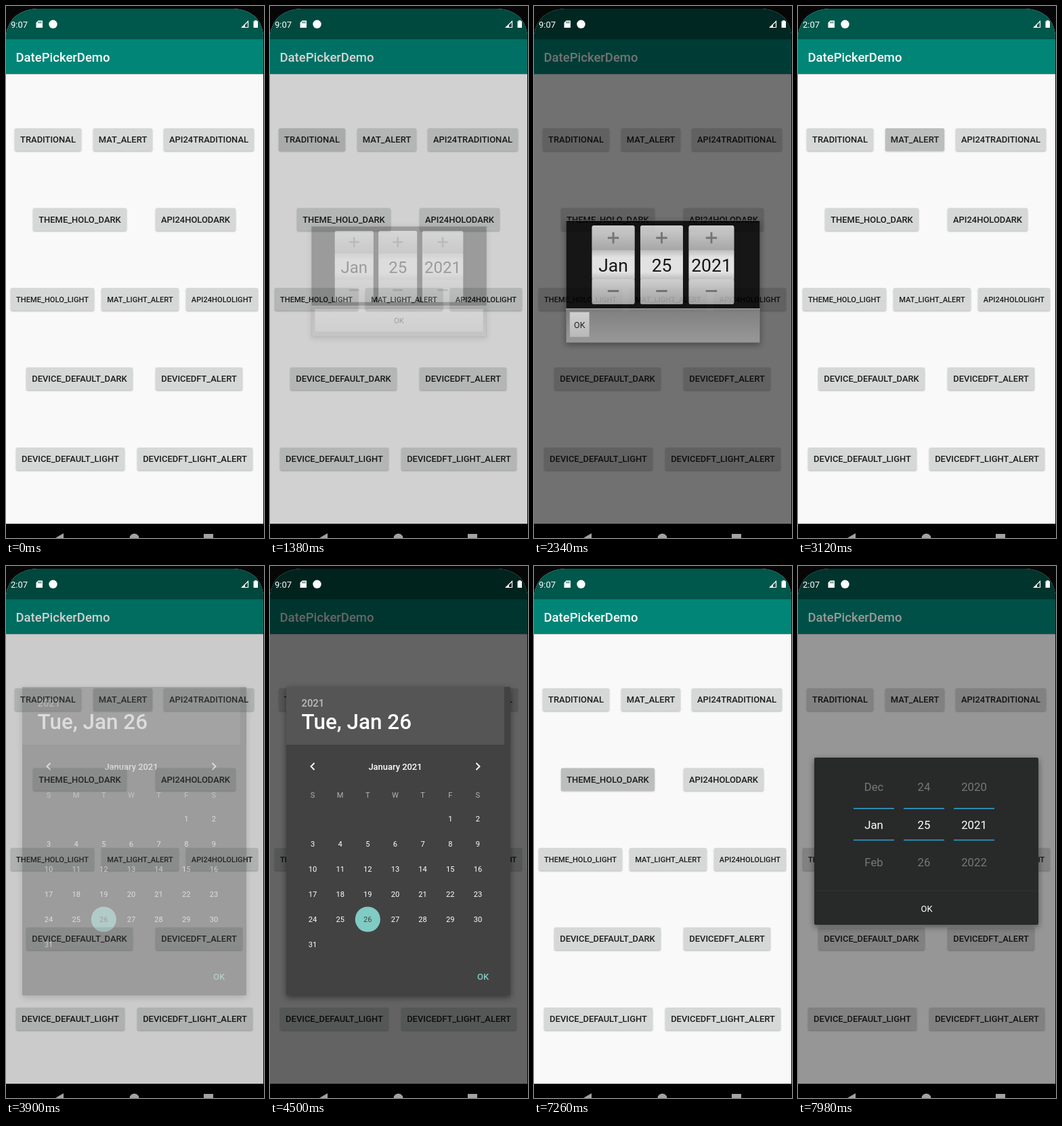
An HTML page that plays this animation: 381x783 px, repeating every 8 s.

```html
<!DOCTYPE html>
<html lang="en">
<head>
<meta charset="utf-8">
<title>Date picker demo</title>
<style>
  html, body { margin: 0; width: 100%; height: 100%; overflow: hidden; background: #060606; }
  svg { display: block; font-family: Roboto, sans-serif; }
  .medium { font-weight: 500; }
  .button { filter: drop-shadow(0 1px 1px rgba(0, 0, 0, .28)); }
  .dialog { filter: drop-shadow(0 3px 5px rgba(0, 0, 0, .45)); transform-origin: 190.5px 405.5px; }
</style>
</head>
<body>
<svg id="stage" width="381" height="783" viewBox="0 0 381 783">
  <defs>
    <clipPath id="screen"><path d="M0 783V42Q6 6 46 4H336Q375 6 380 42V783Z"/></clipPath>
    <linearGradient id="key" x2="0" y2="1"><stop stop-color="#e6e6e6"/><stop offset="1" stop-color="#b4b4b4"/></linearGradient>
    <linearGradient id="field" x2="0" y2="1">
      <stop stop-color="#d2d2d2"/><stop offset=".25" stop-color="#fff"/>
      <stop offset=".75" stop-color="#fff"/><stop offset="1" stop-color="#d2d2d2"/>
    </linearGradient>
    <linearGradient id="ok" x2="0" y2="1"><stop stop-color="#e8e8e8"/><stop offset="1" stop-color="#cbcbcb"/></linearGradient>
    <linearGradient id="bar" x2="0" y2="1"><stop stop-color="#848484"/><stop offset="1" stop-color="#a2a2a2"/></linearGradient>
  </defs>
  <g clip-path="url(#screen)">
    <rect width="381" height="783" fill="#f9f9f9"/>
    <rect width="381" height="49" fill="#00574b"/>
    <rect y="49" width="381" height="51" fill="#008577"/>
    <rect y="100" width="381" height="1" fill="#c4cecc"/>
    <text class="medium" x="14.5" y="82" font-size="18.5" fill="#fff">DatePickerDemo</text>
    <g id="buttons"></g>
    <rect id="dim" width="381" height="762"/>
  </g>
  <g fill="#fff">
    <text id="clock" x="7" y="32" font-size="13"></text>
    <path d="M47.5 21.5H54V32H44.5V24.5Z"/>
    <path d="M48 23v2.5M50 23v2.5M52 23v2.5" stroke="#00574b"/>
    <circle cx="69.5" cy="26.8" r="6.2"/>
    <path d="M348.5 31.5H357.5V22.5Z" fill="none" stroke="#fff" stroke-width="1.2"/>
    <path d="M347.5 32L353 26.500V32Z"/>
    <path d="M365.500 22.300H367.300V21H370.300V22.300H372V32H365.500Z"/>
  </g>
  <rect y="762" width="381" height="21"/>
  <g fill="#a3a3a3">
    <path d="M85 776V790L73 783Z"/>
    <circle cx="189.500" cy="783.500" r="7"/>
    <rect x="292" y="777" width="14" height="14"/>
  </g>
  <g id="trad" class="dialog"></g>
  <g id="material" class="dialog"></g>
  <g id="holo" class="dialog"></g>
</svg>
<script>
const $ = id => document.getElementById(id);
const rect = (x, y, w, h, fill, extra = '') =>
  `<rect x="${x}" y="${y}" width="${w}" height="${h}" fill="${fill}" ${extra}/>`;
const label = (s, x, y, size, fill, extra = 'text-anchor="middle"') =>
  `<text x="${x}" y="${y}" font-size="${size}" fill="${fill}" ${extra}>${s}</text>`;
const mediumMid = 'text-anchor="middle" class="medium"';

// Each row: top, font size, then [name, left, right]
const rows = [
  [180, 12.95, ['TRADITIONAL', 13, 111], ['MAT_ALERT', 129, 216], ['API24TRADITIONAL', 233, 366]],
  [297.5, 12.95, ['THEME_HOLO_DARK', 40, 178], ['API24HOLODARK', 221, 339]],
  [415, 11.1, ['THEME_HOLO_LIGHT', 7, 130], ['MAT_LIGHT_ALERT', 141, 255], ['API24HOLOLIGHT', 266, 372]],
  [532, 12.95, ['DEVICE_DEFAULT_DARK', 30, 187], ['DEVICEDFT_ALERT', 221, 349]],
  [650, 12.95, ['DEVICE_DEFAULT_LIGHT', 15, 175], ['DEVICEDFT_LIGHT_ALERT', 194, 364]]
];
$('buttons').innerHTML = rows.map(([y, size, ...items]) => items.map(([name, l, r]) =>
  `<g class="button">${rect(l, y, r - l, 33.3, '#d6d7d7', 'rx="2"')}
   ${rect(l, y, r - l, 33.3, '#000', `rx="2" id="${name}" opacity="0"`)}</g>` +
  label(name, (l + r) / 2, y + 16.9 + size * .355, size, '#1d1d1d', mediumMid)
).join('')).join('');

const spinner = ([text, x, w]) => {
  const c = x + w / 2;
  return rect(x, 320, w, 120, 'url(#key)', 'rx="3"') + rect(x, 320, w, 38, 'url(#key)', 'rx="3"') +
    rect(x, 358, w, 44, 'url(#field)') + rect(x, 402, w, 38, 'url(#key)', 'rx="3"') +
    `<path d="M${c - 8.5} 339h17M${c} 330.5v17M${c - 8.5} 420h17" stroke="#777" stroke-width="3"/>` +
    label(text, c, 391, 27.5, '#000');
};
$('trad').innerHTML = rect(42, 312, 297, 187, '#777') + rect(42.5, 313, 296, 134, '#000') +
  rect(42, 446.5, 297, 1.5, '#b8b8b8') + rect(43, 448, 295, 50, 'url(#bar)') +
  [['Jan', 82, 65], ['25', 156, 65], ['2021', 230, 69]].map(spinner).join('') +
  rect(48, 452, 285, 38, 'url(#ok)', 'id="okKey" stroke="#aaa" stroke-width=".6"') +
  label('OK', 190.5, 476, 12.95, '#111', 'text-anchor="middle" id="okText"');

const column = i => 63 + 40.65 * i;
let calendar = rect(24, 178, 331, 454, '#424242', 'rx="1"') + rect(24, 178, 322, 85, '#555') +
  label('2021', 46.500, 206.500, 14.8, '#bebebe', 'class="medium"') +
  label('Tue, Jan 26', 46.500, 239.5, 31.4, '#fff', 'class="medium"') +
  label('January 2021', 185, 299.5, 12.95, '#fff', mediumMid) +
  '<path d="M65.500 290L60.500 295L65.500 300M304.500 290L309.500 295L304.500 300" fill="none" stroke="#fff" stroke-width="1.9"/>' +
  `<circle cx="${column(2)}" cy="520" r="18.6" fill="#80cbc4"/>` +
  [...'SMTWTFS'].map((d, i) => label(d, column(i), 341, 11.1, '#b3b3b3')).join('');
for (let day = 1; day <= 31; day++) {
  const cell = day + 4;
  calendar += label(day, column(cell % 7), 376 + 37 * Math.floor(cell / 7), 11.1, day === 26 ? '#424242' : '#fff');
}
$('material').innerHTML = calendar + label('OK', 314.5, 609, 12.95, '#80cbc4', mediumMid);

const wheel = (values, i) => {
  const c = 112 + 74 * i;
  return rect(c - 30, 356, 60, 1.8, '#2b94bd') + rect(c - 30, 402.500, 60, 1.8, '#2b94bd') +
    values.map((v, r) => label(v, c, 331 + 55.5 * r, 16.8, r === 1 ? '#fff' : '#777')).join('');
};
$('holo').innerHTML = rect(24, 282, 331, 246, '#282929', 'rx="2"') + rect(24, 477.5, 331, 1, '#353535') +
  [['Dec', 'Jan', 'Feb'], [24, 25, 26], [2020, 2021, 2022]].map(wheel).join('') +
  label('OK', 190, 508.500, 12.95, '#fff');

const ramp = (t, from, to) => Math.min(1, Math.max(0, (t - from) / (to - from)));
const pulse = (t, a, b, c, d) => ramp(t, a, b) * (1 - ramp(t, c, d));
const set = (id, name, value) => $(id).setAttribute(name, value);

function showDialog(id, alpha, shrink) {
  const el = $(id);
  el.style.opacity = alpha;
  el.style.display = alpha ? '' : 'none';
  el.style.transform = alpha < 1 && shrink ? `scale(${1 - shrink * (1 - alpha)})` : 'none';
}

function draw() {
  const t = Math.floor(performance.now() % 8000 / 60) * 60;
  $('clock').textContent = (t >= 2940 && t < 4500 || t >= 7740 ? '2' : '9') + ':07';

  set('TRADITIONAL', 'opacity', .12 * pulse(t, 720, 840, 1320, 1440));
  set('MAT_ALERT', 'opacity', .12 * pulse(t, 2880, 3120, 3840, 3960));
  set('THEME_HOLO_DARK', 'opacity', .12 * pulse(t, 7080, 7260, 7680, 7800));

  set('dim', 'opacity', .6 * (pulse(t, 1300, 1600, 2315, 2580) +
    pulse(t, 3820, 4080, 6310, 6460) + ramp(t, 7780, 8080)));

  showDialog('trad', pulse(t, 1340, 1500, 2310, 2460), .17);
  showDialog('material', pulse(t, 3850, 4000, 6295, 6395), 0);
  showDialog('holo', ramp(t, 7780, 7950), .17);

  const closing = t >= 2340;
  set('okKey', 'width', closing ? 30 : 285);
  set('okText', 'x', closing ? 63 : 190.5);
  requestAnimationFrame(draw);
}
draw();
</script>
</body>
</html>
```
